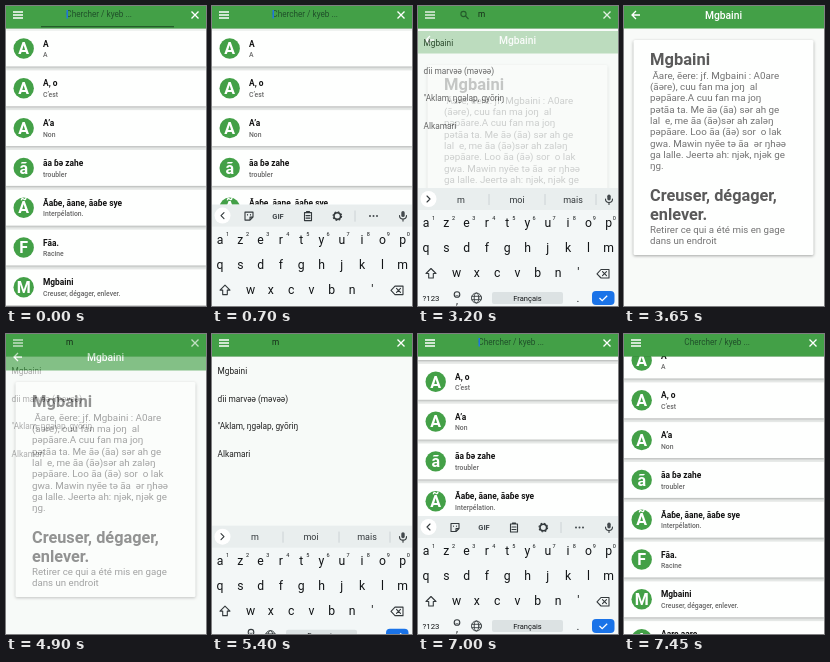
An HTML page for the animation above (7500 ms loop, 200 by 300 pixels).

```html
<!DOCTYPE html>
<html lang="fr">
<head>
<meta charset="utf-8">
<style>
html, body { margin: 0; width: 100%; height: 100%; overflow: hidden; background: #f7faf8; }
svg { display: block; width: 200px; height: 300px; font-family: Roboto, "Noto Sans", sans-serif; }
text { white-space: pre; }
.card { fill: #fefffe; filter: drop-shadow(0 1px 1.5px rgba(0,0,0,.34)); }
.line { fill: none; stroke: #33393c; stroke-width: 1.1; stroke-linecap: round; stroke-linejoin: round; }
.white { fill: none; stroke: #fff; stroke-width: 1.3; }
</style>
</head>
<body>
<svg viewBox="0 0 200 300">
  <g id="list"></g>
  <g id="results"></g>
  <g id="bar">
    <rect width="200" height="22.5" fill="#43a047" style="filter:drop-shadow(0 .5px .7px rgba(0,0,0,.3))"/>
    <path id="icons" class="white" d="M7 6h10M7 9h10M7 12h10M185.500 5.500l7 7M192.500 5.500l-7 7"/>
    <rect id="rule" x="35" y="20" width="133" height="1.3" fill="#245c2a"/>
    <g id="lens" fill="none" stroke="#245c2a" stroke-width="1.1"><circle cx="45.500" cy="8" r="2.600"/><path d="M47.500 10l3 3"/></g>
    <text id="hint" x="60.300" y="10.600" font-size="8.2" fill="#20502a">Chercher / kyeb ...</text>
    <g id="typed" fill="#142a17"><text x="60" y="10.600" font-size="8.2">m</text><rect id="under" x="60" y="12" width="7" height=".7"/></g>
    <rect id="caret" y="4" width="1.4" height="8.500" fill="#2176ee"/>
    <path id="handle" d="M67 11.500l4 4a5.600 5.600 0 1 1-8 0z" fill="#a3cea6"/>
  </g>
  <g id="detail">
    <rect y="0" width="200" height="300" fill="#f8faf8"/>
    <rect width="200" height="22.500" fill="#43a047"/>
    <path class="white" d="M16 9H8M12 5L8 9l4 4"/>
    <text x="99.500" y="13" font-size="10.3" font-weight="500" fill="#fff" text-anchor="middle">Mgbaini</text>
    <rect class="card" x="9.500" y="34" width="180" height="215" rx="1.500"/>
  </g>
  <g id="keys">
    <rect y="182" width="200" height="118" fill="#f3f7f7"/>
    <rect y="182" width="200" height="22" fill="#e9eeee"/>
    <rect id="press" width="19" height="20" rx="3" fill="#cdd4d8"/>
    <circle cx="10.500" cy="193" r="8" fill="#fff"/>
    <path id="chev" class="line"/>
    <g id="tools">
      <path class="line" d="M33 189.500h8v5l-3 3h-5zM41 194.500h-3v3M35.500 192v.3M38.500 192v.3"/>
      <text x="66" y="196" font-size="7.500" font-weight="700" fill="#43494d" text-anchor="middle">GIF</text>
      <path class="line" d="M92.500 190h7v8h-7zM94.500 189h3M94 193h4M94 195.500h4"/>
      <circle class="line" cx="125.300" cy="193.500" r="3.300" style="stroke-width:1.600"/>
      <circle class="line" cx="125.300" cy="193.500" r="4.300" stroke-dasharray="1.700 1.677" style="stroke-linecap:butt"/>
      <path d="M143 188v11" stroke="#c5cbce" stroke-width=".8"/>
      <g fill="#43494d"><circle cx="158" cy="193.500" r="1"/><circle cx="161.500" cy="193.500" r="1"/><circle cx="165" cy="193.500" r="1"/></g>
    </g>
    <g id="words"><path d="M71 188v11M127 188v11M178 188v11" stroke="#c5cbce" stroke-width=".8"/></g>
    <rect x="189.300" y="188.500" width="3.400" height="6" rx="1.700" fill="#43494d"/>
    <path class="line" d="M187.500 193a3.500 3.500 0 0 0 7 0M191 196.500v2"/>
    <path class="line" d="M13 262.500l5 5h-2.700v4.500h-4.600v-4.500H8zM183 263.500h8v8.500h-8l-4-4.200zM184.500 265.700l4 4M188.500 265.700l-4 4"/>
    <circle class="line" cx="39" cy="288.500" r="2.800"/><path class="line" d="M37.800 289.500q1.200 1 2.400 0" style="stroke-width:.7"/>
    <g class="line" style="stroke-width:.9"><circle cx="58.500" cy="292" r="5"/><ellipse cx="58.500" cy="292" rx="2.300" ry="5"/><path d="M54 290.300h9M54 293.700h9"/></g>
    <rect x="74" y="286" width="71" height="12" rx="2" fill="#dce2e3"/>
    <rect x="174" y="285" width="22.500" height="14" rx="4" fill="#1a73e8"/>
    <path class="white" d="M181.500 292l2.700 2.700 5-5"/>
  </g>
</svg>
<script>
const $ = id => document.getElementById(id);
const NS = 'http://www.w3.org/2000/svg';
function add(parent, tag, attrs, text) {
  const el = document.createElementNS(NS, tag);
  for (const k in attrs) el.setAttribute(k, attrs[k]);
  if (text) el.textContent = text;
  parent.append(el);
  return el;
}
const label = (parent, x, y, size, text, fill, weight = 400, anchor = 'start') =>
  add(parent, 'text', { x, y, 'font-size': size, fill, 'font-weight': weight, 'text-anchor': anchor }, text);

// Dictionary rows
[['A', 'A', 'A'], ['A', 'A, o', 'C’est'], ['A', 'A’a', 'Non'],
 ['ã', 'ãa ɓə zahe', 'troubler'], ['Ã', 'Ãaɓe, ãane, ãaɓe sye', 'Interpélation.'],
 ['F', 'Fãa.', 'Racine'], ['M', 'Mgbaini', 'Creuser, dégager, enlever.'],
 ['A', 'Aare aare', 'Bâiller'], ['A', 'Aaya', 'Oui']].forEach(([cap, word, gloss], i) => {
  const y = 42.500 + 39.800 * i, g = $('list');
  add(g, 'rect', { class: 'card', x: -1, y: y - 18, width: 202, height: 36 });
  add(g, 'circle', { cx: 17.700, cy: y, r: 10.200, fill: '#43a047' });
  label(g, 17.700, y + 5.700, 16, cap, '#fff', 700, 'middle');
  label(g, 37, y - 2, 8.400, word, '#111', 700);
  label(g, 37, y + 8.600, 6.800, gloss, '#666', 500);
});

add($('results'), 'rect', { y: 20, width: 200, height: 280, fill: '#f7faf8' });
['Mgbaini', 'ɗii marvəə (məvəə)', '"Aklam, ŋgəlap, gyõriŋ', 'Alkamari'].forEach((s, i) =>
  label($('results'), 5.500, 39.800 + 27.800 * i, 8.300, s, '#222'));

// Entry page
const page = $('detail'), HEAD = '#5a5a5a', BODY = '#737373';
label(page, 26, 59, 16.500, 'Mgbaini', HEAD, 700);
[' Ãare, ẽere: jf. Mgbaini : A0are', '(ãəre), cuu fan ma joŋ  al', 'pəpãare.A cuu fan ma joŋ',
 'pətãa ta. Me ãə (ãa) sər ah ge', 'lal  e, me ãa (ãə)sər ah zaləŋ', 'pəpãare. Loo ãa (ãə) sor  o lak',
 'gwa. Mawin nyẽe tə ãa  ər ŋhəə', 'ga lalle. Jeertə ah: njək, njək ge', 'ŋg.'].forEach((s, i) =>
  label(page, 26, 72.500 + 11.350 * i, 9.800, s, BODY));
label(page, 26, 194.500, 16.300, 'Creuser, dégager,', HEAD, 700);
label(page, 26, 213.500, 16.300, 'enlever.', HEAD, 700);
label(page, 26, 226.500, 9.700, 'Retirer ce qui a été mis en gage', BODY);
label(page, 26, 238, 9.700, 'dans un endroit', BODY);

// Keyboard letters
const key = (x, y, s, size = 12.200) => label($('keys'), x, y, size, s, '#111416', 400, 'middle');
[...'azertyuiop'].forEach((c, i) => {
  key(8 + 20.300 * i, 221, c);
  key(15.500 + 20.100 * i, 213.500, String((i + 1) % 10), 5.500);
});
[...'qsdfghjklm'].forEach((c, i) => key(8 + 20.300 * i, 246, c));
[...'wxcvbn\''].forEach((c, i) => key(38.500 + 20.300 * i, 271, c));
key(13, 295, '?123', 7.800);
key(39, 298, ',', 10);
key(160, 296, '.', 11);
key(109.500, 294.700, 'Français', 7.500);
['m', 'moi', 'mais'].forEach((s, i) =>
  label($('words'), 43 + 56 * i, 196.800, 9, s, '#33383b', 400, 'middle'));

// Value of a step table at time t; eased between entries
function at(t, steps) {
  let [t0, v0] = steps[0];
  for (const [t1, v1] of steps) {
    if (t < t1) {
      const p = (t - t0) / (t1 - t0);
      return t <= t0 ? v0 : v0 + (v1 - v0) * p * (2 - p);
    }
    t0 = t1; v0 = v1;
  }
  return v0;
}
const within = (t, ...spans) => spans.some(([a, b]) => t >= a && t < b);
const show = (id, on) => { $(id).style.opacity = +on; };
const move = (id, y) => $(id).setAttribute('transform', `translate(0 ${y})`);

const SCROLL = [[6600, 0], [6850, 40], [7000, 34.500], [7350, 17], [7450, 16]];
const BOARD = [[450, 118], [850, 0], [3250, 0], [3600, 118], [5150, 118], [5500, 0], [7050, 0], [7300, 118]];
const SLIDE = [[3200, 25], [3500, 0], [4850, 0], [4900, 14], [5100, 75]];
const FADE = [[3150, 0], [3200, .32], [3450, 1], [4850, 1], [4900, .64], [5100, 0]];

function render(t) {
  const found = within(t, [1300, 6350]);
  show('results', found);
  show('typed', found);
  show('under', within(t, [1300, 1700], [6250, 6350]));
  show('hint', at(t, [[0, 1], [1300, 1], [1400, .5], [1500, 0], [6250, 0], [6450, 1]]));
  show('rule', at(t, [[0, 1], [50, .7], [100, .3], [150, 0]]));
  show('lens', within(t, [3200, 3700]));
  show('handle', within(t, [5700, 6350]));
  show('caret', within(t, [0, 2550], [3050, 3200], [5700, 7050]));
  $('caret').setAttribute('x', found ? 67 : 60.500);
  move('list', -at(t, SCROLL));
  move('detail', at(t, SLIDE));
  const fade = at(t, FADE);
  show('detail', fade);
  show('icons', 1 - .5 * fade);
  move('keys', at(t, BOARD));

  const suggest = within(t, [1500, 6250]);
  show('words', suggest);
  show('tools', !suggest);
  $('chev').setAttribute('d', suggest ? 'M9 190l3 3-3 3' : 'M12 190l-3 3 3 3');
  const back = within(t, [6000, 6100]);
  show('press', back || within(t, [1150, 1300]));
  $('press').setAttribute('x', back ? 176 : 181);
  $('press').setAttribute('y', back ? 258 : 232);
}

function tick(now) {
  render(Math.floor(now % 7500 / 50) * 50);
  requestAnimationFrame(tick);
}
render(0);
requestAnimationFrame(tick);
</script>
</body>
</html>
```
